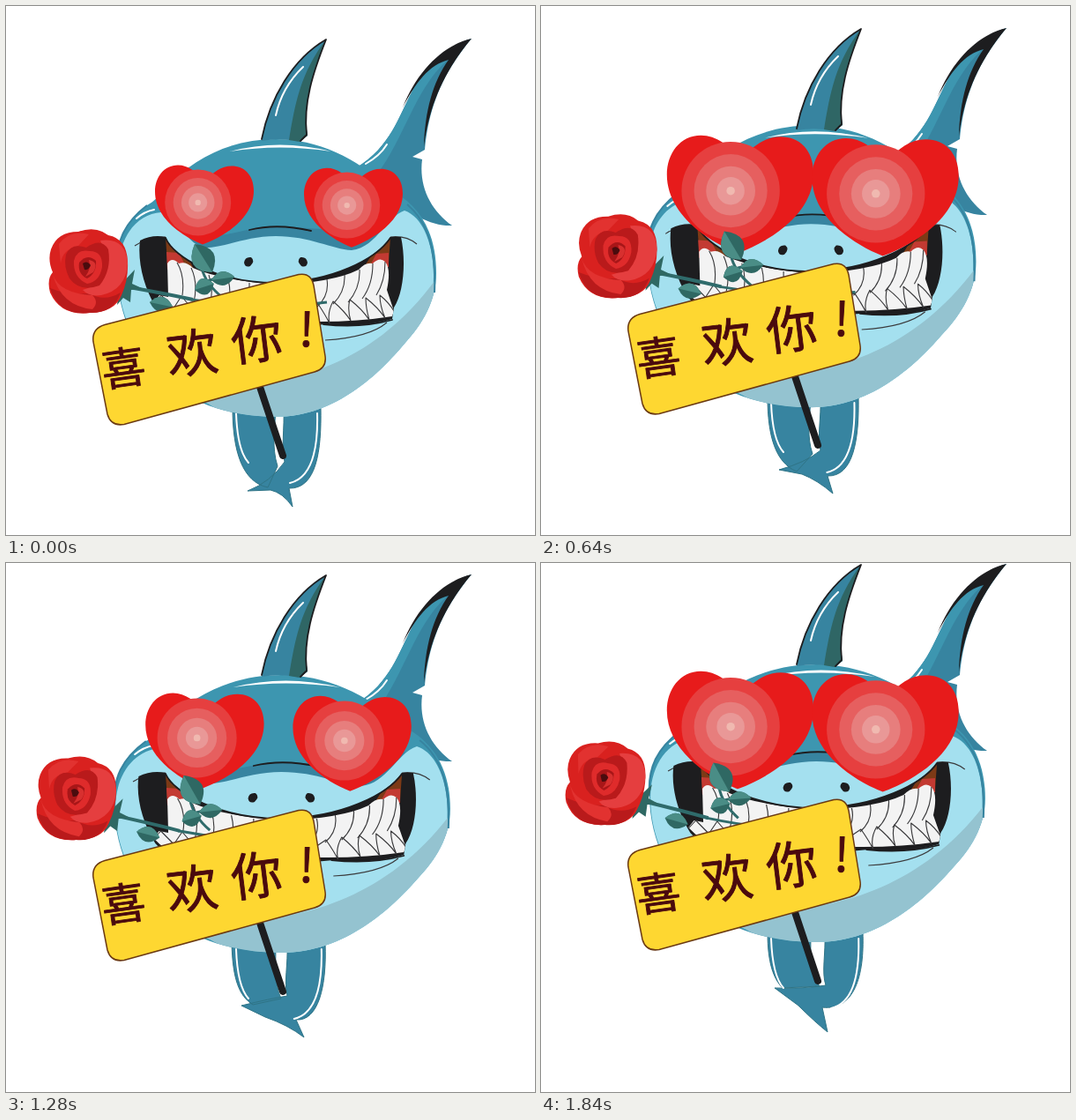
Recreate the animation shown at these times as an HTML page without scripts. Size 600 px wide and 600 px high, loop 2080 ms.

```html
<!DOCTYPE html>
<html lang="zh">
<head>
<meta charset="utf-8">
<title>Shark in love</title>
<style>
html, body { margin: 0; width: 100%; height: 100%; overflow: hidden; background: #fff; }
svg { display: block; width: 100vw; height: 100vh; }

@property --lift { syntax: "<number>"; inherits: true; initial-value: 0; }
@property --beat { syntax: "<number>"; inherits: true; initial-value: 1; }
@property --wide { syntax: "<number>"; inherits: true; initial-value: 1; }
@property --tall { syntax: "<number>"; inherits: true; initial-value: 1; }
@property --side { syntax: "<number>"; inherits: true; initial-value: 0; }

/* 26 ticks of 80 ms; the last pose holds for three */
#shark { animation: lift 2080ms step-end infinite, beat 2080ms step-end infinite, puff 2080ms step-end infinite;
  transform: translateY(calc(var(--lift) * -12px)); }
#foot { animation: foot 2080ms step-end infinite; }
#calf { transform: translateX(calc(var(--lift) * 2.4px)); }
#face { transform: translate(calc(306px + var(--side) * 1px), 378px) scale(var(--wide), var(--tall)) translate(-306px, -378px); }
#rose { transform: translate(calc(93px - var(--lift) * 6.7px), calc(301px - var(--lift) * 5px)) rotate(calc(var(--lift) * 1.17deg)) translate(-93px, -301px); }
.heart { transform: scale(var(--beat)); }

@keyframes lift {
  0%, 34.61%, 69.23% { --lift: 0; }
  3.84%, 30.76%, 38.46%, 65.38%, 73.07% { --lift: 1; }
  7.69%, 26.92%, 42.3%, 61.53%, 76.92% { --lift: 2; }
  11.53%, 46.15%, 80.76%, 100% { --lift: 3; }
}
@keyframes beat {
  0%, 19.23%, 38.46%, 57.69%, 76.92% { --beat: 1; }
  3.84%, 23.07%, 42.3%, 61.53%, 80.76% { --beat: 1.2; }
  7.69%, 26.92%, 46.15%, 65.38%, 84.61% { --beat: 1.34; }
  11.53%, 30.76%, 50%, 69.23%, 88.46%, 100% { --beat: 1.485; }
  15.38%, 34.61%, 53.84%, 73.07% { --beat: 1.24; }
}
@keyframes puff {
  0% { --wide: 1; --tall: 1; --side: 0; }
  3.84%, 30.76% { --wide: 1.03; --tall: 1.015; --side: 0; }
  7.69%, 26.92% { --wide: 1.058; --tall: 1.029; --side: 0; }
  11.53% { --wide: 1.094; --tall: 1.044; --side: 0; }
  34.61%, 100% { --wide: 1.052; --tall: 1; --side: 6.4; }
}
@keyframes foot {
  0%, 34.61%, 69.23% { d: path("M306 455C305 480 301 500 308 522L297 546C268 540 257 505 257 455ZM315 455H357C358 505 352 548 321 547L325 568Q314 552 300 549L274 550Q300 540 316 517C312 500 316 480 315 455Z"); }
  3.84%, 30.76%, 38.46%, 65.38% { d: path("M306 455C305 480 301 500 308 520L290 540C266 530 257 500 257 455ZM317 455H360C361 505 354 546 325 545L331 565Q314 550 296 543L270 538Q300 530 317 516C313 500 318 480 317 455Z"); }
  7.69%, 26.92%, 42.3%, 61.53% { d: path("M306 455C306 480 304 500 312 518L280 525C264 515 257 495 256 455ZM319 455H362C364 505 354 544 329 542L338 562Q320 548 294 539L267 526Q300 518 319 515C315 500 320 480 319 455Z"); }
  11.53%, 46.15% { d: path("M308 455C308 480 306 500 316 516L274 518C262 508 257 490 255 455ZM322 455H365C367 505 355 542 333 540L345 558Q322 545 294 535L265 518Q298 519 323 515C318 500 323 480 322 455Z"); }
  73.07% { d: path("M306 455C305 480 301 500 308 520L290 540C266 530 257 500 257 455ZM315 455H360C361 505 354 546 319 545L325 568Q314 554 296 544L270 538Q300 530 317 516C313 500 316 480 315 455Z"); }
  76.92% { d: path("M306 455C306 480 304 500 312 518L280 525C264 515 257 495 257 455ZM319 455H362C364 505 354 544 320 542L325 568Q312 556 294 541L267 526Q300 518 319 515C315 500 320 480 319 455Z"); }
  80.76%, 100% { d: path("M306 455C306 480 304 500 316 516L274 518C264 508 257 490 257 455ZM322 455H365C367 505 355 544 319 540L325 568Q310 556 292 538L265 518Q298 519 323 515C318 500 323 480 322 455Z"); }
}

.line { fill: none; stroke: #1d1d1f; stroke-width: 1.8; stroke-linecap: round; stroke-linejoin: round; }
.thin { fill: none; stroke: #3a3a3c; stroke-width: 1.1; stroke-linejoin: round; }
.white { fill: none; stroke: #fff; stroke-width: 2; stroke-linecap: round; }
text { font: 400 58px "Noto Sans CJK SC", "Noto Sans CJK", "Noto Sans CJK JP", sans-serif; text-anchor: middle;
  fill: #4a0a0e; stroke: #4a0a0e; stroke-width: .9; stroke-linejoin: round; }
</style>
</head>
<body>
<svg viewBox="0 0 600 600">
<defs>
  <path id="head" d="M306 151C352 151 400 172 432 207C470 224 488 258 488 303C488 335 472 361 452 383C425 415 375 466 306 466C262 466 222 455 190 432C150 405 126 350 126 300C124 268 134 246 160 226C168 222 174 215 180 207C215 170 258 151 306 151Z"/>
  <path id="mouth" d="M152 266Q166 259 181 262C190 285 240 314 306 314C370 313 420 287 436 262L448 262C454 290 451 325 440 342L438 355Q404 366 362 361L250 372Q190 368 170 342C156 318 149 290 152 266Z"/>
  <clipPath id="inHead"><use href="#head"/></clipPath>
  <clipPath id="inMouth"><use href="#mouth"/></clipPath>
  <g id="love">
    <path fill="#e71b1b" d="M1-27C-9-37-18-45-30-45C-46-45-56-31-56-15C-56 14-27 35-2 45C25 35 56 14 56-16C56-34 45-44 31-44C19-44 10-37 1-27Z"/>
    <g transform="translate(-7.3-2.6)">
      <circle r="37.5" fill="#e63f3f"/>
      <circle r="28" fill="#e65f5f"/>
      <circle r="18.8" fill="#e77e7d"/>
      <circle r="10.6" fill="#e99897"/>
      <circle r="3.2" fill="#f0b9b0"/>
    </g>
  </g>
  <g id="leaf">
    <path fill="#2f6863" d="M0 0Q13-15 27 0Q13 14 0 0Z"/>
    <path fill="#4a8d86" d="M0 0Q13-15 27 0Z"/>
  </g>
</defs>

<g id="shark">
  <!-- tail -->
  <path fill="#3784a0" d="M398 183C436 160 446 124 460 98C474 70 500 44 528 37C492 80 479 120 475 163L461 171L472 174C468 205 482 232 506 249C482 250 456 236 440 214Z"/>
  <path fill="#3d96b0" d="M398 183C436 160 446 124 460 98C470 78 482 68 500 62C464 94 452 150 420 192Z"/>
  <path fill="#1d1d1f" d="M450 115C466 74 496 44 528 37C492 80 479 120 474 160C475 120 484 86 502 61C480 66 464 88 450 115Z"/>
  <path class="white" d="M408 179Q424 170 432 157"/>

  <!-- lower body -->
  <path id="foot" fill="#3784a0" stroke="#2f7486" d="M306 455C305 480 301 500 308 522L297 546C268 540 257 505 257 455ZM315 455H357C358 505 352 548 321 547L325 568Q314 552 300 549L274 550Q300 540 316 517C312 500 316 480 315 455Z"/>
  <path class="white" d="M261 462C262 490 266 508 275 518"/>
  <path id="calf" class="white" d="M353 462C354 500 348 535 322 541"/>

  <g id="face">
    <use href="#head" fill="#3d96b0"/>
    <g clip-path="url(#inHead)">
      <path fill="#3784a0" d="M195 252C240 272 260 251 306 250C350 250 370 262 440 238L400 285H215Z"/>
      <path fill="#a4e0ef" d="M127 300C128 262 148 236 176 234C195 240 203 266 222 274C245 276 270 261 306 261C345 261 370 276 392 277C420 274 430 240 452 232C475 240 485 275 485 305C486 400 400 466 306 466C200 466 126 390 127 300Z"/>
      <path fill="#94c3d0" d="M200 424C290 440 405 422 486 312C484 440 390 470 306 470C260 470 225 457 200 424Z"/>
    </g>
    <path fill="none" stroke="#3784a0" stroke-width="2" d="M160 226C134 246 124 268 126 300M455 225C480 246 488 280 486 325"/>
    <path fill="#fff" d="M254 165Q310 150 369 165Q310 156 254 165Z"/>
    <path class="white" d="M148 241Q157 233 168 231"/>
    <path class="line" d="M276 254Q308 246 346 255"/>
    <path class="thin" d="M146 272Q160 262 181 262M436 262Q454 260 466 270M362 379Q412 376 432 359"/>

    <use href="#mouth" fill="#1d1d1f"/>
    <g clip-path="url(#inMouth)">
      <path fill="#7d3a16" d="M181 262L183 292L214 300L204 281ZM436 262L434 292L405 298L416 280Z"/>
      <path fill="#c33a32" d="M182 279L196 280L206 299H183ZM434 280L420 281L412 296H434Z"/>
      <path fill="#f3f3f3" d="M183 292Q188 284 196 292Q204 289 212 297Q240 310 306 316Q370 314 400 299Q408 290 416 292Q424 284 430 290Q437 298 432 322L440 346L438 352Q400 358 355 358H200Q180 350 168 336L174 328L184 330Z"/>
      <path class="thin" d="M194 291Q203 306 200 328M210 297Q218 314 213 336M230 305Q236 322 231 340M252 310Q256 326 252 343M276 314V342M304 316V344M344 314Q348 330 336 345M364 310Q367 328 353 341M384 305Q385 324 371 338M401 299Q402 320 388 336M416 292Q416 316 404 332M430 290Q430 312 420 328"/>
      <path class="thin" d="M168 337L176 328L190 343L199 329L213 346L222 336L240 350L254 341L276 354L300 342L330 355L354 338Q362 350 367 360Q364 348 371 335Q384 346 391 357Q387 344 390 333Q404 344 412 356Q408 342 408 331Q422 342 430 354Q424 340 424 328Q434 336 440 346"/>
    </g>
    <path class="line" stroke-width="2.500" d="M181 263C190 285 240 314 306 314C370 313 420 287 436 263M360 361Q402 366 438 356"/>
    <path fill="#1d1d1f" d="M270 291Q271 284 278 285Q283 289 277 295Q271 297 270 291ZM342 291Q341 284 334 285Q329 289 335 295Q341 297 342 291Z"/>
  </g>

  <!-- back fin -->
  <path fill="#3784a0" d="M363 38C325 60 299 105 290 153Q312 149 333 154L342 147C336 110 348 76 363 38Z"/>
  <path fill="#2f6665" d="M363 38C334 76 328 110 321 152L333 154L342 147C336 110 348 76 363 38Z"/>
  <path class="line" d="M290 151C299 105 325 60 363 38C348 76 337 110 341 146L334 153"/>
  <path class="white" d="M337 69Q313 92 306 124"/>

  <g transform="translate(223 225.5)"><g class="heart"><use href="#love" x="2"/></g></g>
  <g transform="translate(401 228.7)"><g class="heart"><use href="#love" x="-7"/></g></g>

  <g id="rose">
    <path fill="none" stroke="#2f6b6b" stroke-width="4" d="M134 318Q180 326 212 333"/>
    <path fill="none" stroke="#2f6b6b" stroke-width="3" d="M210 333Q290 345 364 336M222 297Q226 315 246 331M228 312L238 309"/>
    <use href="#leaf" transform="translate(234 302)rotate(-122)scale(1.4 1.8)"/>
    <use href="#leaf" transform="translate(214 322)rotate(-18)scale(.85 1.3)"/>
    <use href="#leaf" transform="translate(233 311)rotate(-8)scale(.98 1.1)"/>
    <use href="#leaf" transform="translate(163 336)rotate(12)scale(1 1.2)"/>
    <path fill="#2f6863" d="M130 316L146 299L143 315L154 320L142 322L141 336L133 331L126 339L128 322Z"/>
    <path fill="#d9211f" d="M51 276Q58 256 82 256Q102 249 116 260Q137 264 138 290Q139 310 131 328Q124 347 95 348Q62 352 50 325Q46 310 53 302Q47 288 51 276Z"/>
    <path fill="#b91a1b" d="M50 320Q70 328 94 326Q112 336 130 325Q122 349 95 348Q60 352 50 320Z"/>
    <path fill="#e23230" d="M53 304Q60 326 98 328Q106 336 98 344Q62 340 53 304ZM60 270Q72 254 94 259L82 272Q64 276 62 292Z"/>
    <path fill="#e53e3f" d="M107 266Q136 262 138 292Q136 322 108 328Q94 330 87 322Q114 314 116 290Z"/>
    <path fill="#b91a1b" d="M68 282Q74 268 91 274Q108 262 116 276Q120 300 106 317Q84 325 72 309Q65 296 68 282Z"/>
    <path fill="#df2b2b" d="M77 289Q80 275 95 278Q110 278 109 296Q106 313 92 315Q76 308 77 289Z"/>
    <path fill="#a81618" d="M83 291Q92 280 102 289Q103 303 92 309Q81 304 83 291Z"/>
    <path fill="#d8302f" d="M94 288Q106 290 99 302L90 307Q97 298 94 288Z"/>
    <path fill="#4a0c0e" d="M87 292Q92 288 96 294Q94 300 89 299Z"/>
  </g>

  <!-- sign -->
  <path stroke="#1d1d1f" stroke-width="8" stroke-linecap="round" d="M286 426L314 510"/>
  <path fill="#fed731" stroke="#6b3a12" stroke-width="1.5" d="M112 361.5L332 304.5Q346 302 349 317L362 397Q364 411 350 415L134 474.5Q119 477 115 463L99 381Q97 366 112 361.5Z"/>
  <text transform="translate(133 410)rotate(-8)" y="19" font-size="50" style="font-size:50px">喜</text>
  <text transform="translate(211 393)rotate(-7)" y="22">欢</text>
  <text transform="translate(284 378)rotate(-7)" y="22">你</text>
  <text transform="translate(341 366)rotate(2)" y="20" style="font-size:53px">!</text>
</g>
</svg>
</body>
</html>
```
